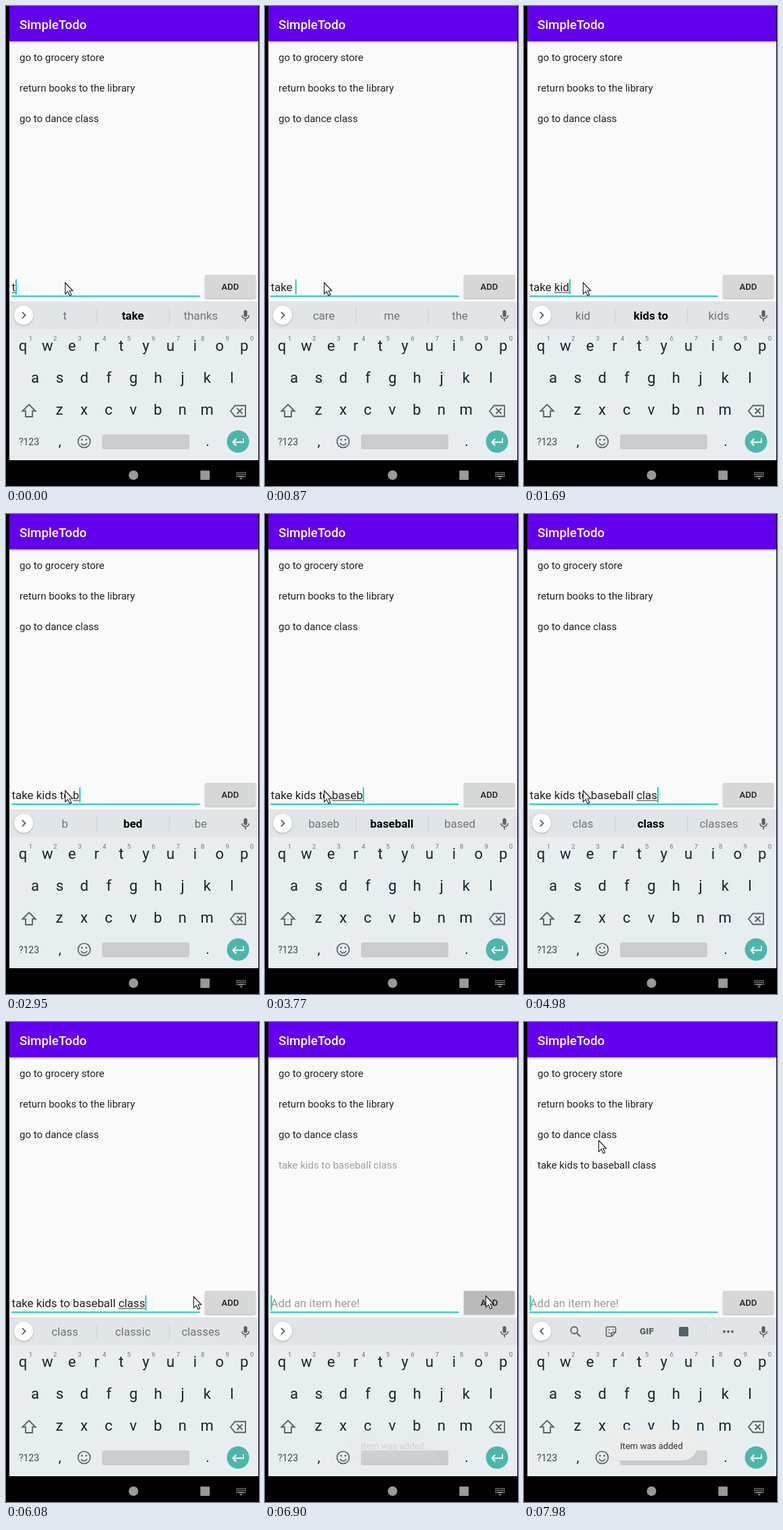
Recreate the animation shown at these times as an HTML page with a canvas. Size 374 by 707 pixels, loop 8000 ms.

```html
<!DOCTYPE html>
<html lang="en">
<head>
<meta charset="utf-8">
<title>Todo list</title>
<style>
html, body { margin: 0; width: 100%; height: 100%; overflow: hidden; background: #000; }
canvas { display: block; width: 374px; height: 707px; }
</style>
</head>
<body>
<canvas id="stage"></canvas>
<script>
const W = 374, H = 707, LOOP = 8000;
const canvas = document.getElementById('stage');
const ctx = canvas.getContext('2d');
const ratio = Math.max(1, window.devicePixelRatio || 1);
canvas.width = W * ratio;
canvas.height = H * ratio;

const TEAL = '#0fcdba', KEY = '#10262f', ICON = '#546169', SOFT = '#6a757b', BAR = '#e1e5e8';

// time, typed text, suggestions; "*" marks the bold one, "_" starts the underlined word
const typing = [
  [0, '_t', 't|*take|thanks'],
  [150, '_tak', 'tak|*take|taking'],
  [300, '_take', 'take|taken|takes'],
  [870, 'take ', 'care|me|the'],
  [1290, 'take _k', 'k|*kids|kind'],
  [1490, 'take _ki', 'ki|*kids|kind'],
  [1690, 'take _kid', 'kid|*kids to|kids'],
  [1850, 'take _kids', 'kids|*kids to|kiss'],
  [1970, 'take kids ', 'to|and|from'],
  [2240, 'take kids _t', 't|*to|the'],
  [2360, 'take kids _to', 'to|to the|too'],
  [2670, 'take kids to ', 'school|the|get'],
  [2950, 'take kids to _b', 'b|*bed|be'],
  [3070, 'take kids to _ba', 'ba|*bath|back'],
  [3190, 'take kids to _bas', 'bas|*baseball|bad'],
  [3620, 'take kids to _base', 'base|*baseball|bases'],
  [3760, 'take kids to _baseb', 'baseb|*baseball|based'],
  [3900, 'take kids to _baseba', 'baseba|*baseball|baseball'],
  [4030, 'take kids to _basebal', 'basebal|*baseball|basal'],
  [4170, 'take kids to _baseball', 'baseball|baseballs|baseline'],
  [4330, 'take kids to baseball ', 'class|game|and'],
  [4580, 'take kids to baseball _c', 'c|*class|can'],
  [4700, 'take kids to baseball _cl', 'cl|*class|clothes'],
  [4830, 'take kids to baseball _cla', 'cla|*class|classes'],
  [4970, 'take kids to baseball _clas', 'clas|*class|classes'],
  [5100, 'take kids to baseball _class', 'class|classic|classes'],
  [6780, '', '']
];

// time, x, y
const pointer = [
  [0, 87, 407], [5680, 93, 407], [5800, 143, 406], [5930, 217, 405],
  [6080, 277, 404], [6230, 315, 403], [6370, 326, 403], [7300, 256, 335],
  [7440, 182, 262], [7580, 132, 210], [7700, 125, 194], [7840, 114, 179], [7980, 110, 174]
];

// time, item opacity, toast opacity, button press, toolbar progress
const adding = [
  [0, 0, 0, 0, 0], [6650, 0, 0, 1, 0], [6780, 0.1, 0, 1, 0], [6900, 0.42, 0.14, 1, 0],
  [7020, 0.85, 0.6, 0.4, 0.4], [7150, 1, 0.95, 0, 1], [7300, 1, 1, 0, 1]
];

const at = (steps, t) => steps.reduce((last, s) => s[0] <= t ? s : last);

function text(str, x, y, size, color, weight = 400, align = 'left') {
  ctx.font = `${weight} ${size}px Roboto, sans-serif`;
  ctx.fillStyle = color;
  ctx.textAlign = align;
  ctx.fillText(str, x, y);
}

function rect(x, y, w, h, color, r = 0) {
  ctx.fillStyle = color;
  ctx.beginPath();
  ctx.roundRect(x, y, w, h, r);
  ctx.fill();
}

function disc(x, y, r, color) {
  ctx.fillStyle = color;
  ctx.beginPath();
  ctx.arc(x, y, r, 0, 7);
  ctx.fill();
}

function line(d, color, width = 1.8, x = 0, y = 0) {
  ctx.save();
  ctx.translate(x, y);
  ctx.strokeStyle = color;
  ctx.lineWidth = width;
  ctx.stroke(new Path2D(d));
  ctx.restore();
}

function shape(d, color, x = 0, y = 0) {
  ctx.save();
  ctx.translate(x, y);
  ctx.fillStyle = color;
  ctx.fill(new Path2D(d));
  ctx.restore();
}

function shadow(blur, dy, alpha, draw) {
  ctx.save();
  ctx.shadowColor = `rgba(0,0,0,${alpha})`;
  ctx.shadowBlur = blur * ratio;
  ctx.shadowOffsetY = dy * ratio;
  draw();
  ctx.restore();
}

function faded(alpha, draw) {
  if (!alpha) return;
  ctx.save();
  ctx.globalAlpha = alpha;
  draw();
  ctx.restore();
}

function drawList(itemAlpha) {
  rect(5, 0, 368, 669, '#fafafa');
  shadow(3, 1, 0.35, () => rect(5, 0, 368, 52, '#6200ee'));
  text('SimpleTodo', 20, 34, 18.76, '#fff', 500);
  ['go to grocery store', 'return books to the library', 'go to dance class']
    .forEach((s, i) => text(s, 20, 81 + 45 * i, 15, '#212121'));
  faded(itemAlpha, () => text('take kids to baseball class', 20, 216, 15, '#212121'));
}

function drawInput(typed, t, press) {
  const x = 8.5, size = 16.88;
  const start = typed.indexOf('_');
  const str = typed.replace('_', '');
  rect(8, 426.6, 278.5, 1.9, TEAL);
  text(str || 'Add an item here!', x, 420, size, str ? '#212121' : '#9b9b9b');
  const end = str ? x + ctx.measureText(str).width : x;
  if (start >= 0) {
    const from = x + ctx.measureText(str.slice(0, start)).width;
    rect(from, 421.6, end - from, 1, '#333');
  }
  if (t < 7300 || t >= 7840) rect(end, 402.5, 1.9, 22.5, TEAL);

  shadow(2, 1, 0.3, () => rect(294, 396, 75, 34.5, '#d6d7d7', 2));
  faded(press, () => rect(294, 396, 75, 34.5, '#b9bab9', 2));
  text('ADD', 331.5, 417.7, 13.1, '#202020', 500, 'center');
}

function drawMic() {
  rect(351.4, 448, 5.2, 10, ICON, 2.6);
  line('M348.8 455.5a5.2 5.2 0 0 0 10.4 0M354 460.7v4', ICON, 1.6);
}

function drawTools() {
  line('M78.2 458.2L83.2 463.2', ICON, 2);
  line('M79.3 454a5 5 0 1 1-10 0a5 5 0 1 1 10 0', ICON, 1.8);
  line('M123.5 449h10q2 0 2 2v6l-6 6h-6q-2 0-2-2v-10q0-2 2-2M135.5 457h-4q-2 0-2 2v4', ICON, 1.6);
  line('M125 456.5q1.5 3 4 2', ICON, 1.3);
  disc(125.7, 453.2, 1, ICON);
  disc(131.3, 453.2, 1, ICON);
  text('GIF', 181.5, 460.4, 13.6, ICON, 900, 'center');
  rect(229, 449, 14, 14, ICON, 1.5);
  rect(268, 445, 1, 22, '#cfd4d7');
  [296, 302, 308].forEach(x => disc(x, 456, 1.9, ICON));
}

function drawBar(words, tools) {
  rect(5, 435, 368, 41, BAR);
  if (words) {
    words.split('|').forEach((w, i) => {
      const bold = w[0] === '*';
      text(w.replace('*', ''), [87, 187.5, 288][i], 462, 16.88, bold ? '#000' : SOFT, bold ? 700 : 400, 'center');
    });
    rect(134, 444, 1, 24, '#cbd0d3');
    rect(241, 444, 1, 24, '#cbd0d3');
  }
  faded(tools, drawTools);
  shadow(3, 1, 0.25, () => disc(26, 455.5, 14, '#fff'));
  ctx.save();
  ctx.translate(26.3, 455.5);
  ctx.rotate(Math.PI * tools);
  line('M-2.4 -4.6L2.2 0L-2.4 4.6', ICON, 1.8);
  ctx.restore();
  drawMic();
}

function drawKeys() {
  const step = 36.35;
  rect(5, 476, 368, 193, '#e8edf0');
  [...'qwertyuiop'].forEach((c, i) => {
    text(c, 25 + step * i, 507.5, 22, KEY, 400, 'center');
    text((i + 1) % 10, 36.3 + step * i, 493, 9.5, SOFT, 400, 'center');
  });
  [...'asdfghjkl'].forEach((c, i) => text(c, 43 + step * i, 555, 22, KEY, 400, 'center'));
  [...'zxcvbnm'].forEach((c, i) => text(c, 79 + step * i, 602, 22, KEY, 400, 'center'));

  line('M0 -9.5L9.7 0H5V8.5H-5V0H-9.7Z', ICON, 1.8, 34, 596.5);
  line('M-11 0L-4.5 -8H11V8H-4.5ZM-1.5 -4L6.5 4M6.5 -4L-1.5 4', ICON, 1.8, 343, 596.5);

  text('?123', 34, 647, 14, '#3c4a52', 400, 'center');
  text(',', 79.5, 648, 21, KEY, 400, 'center');
  text('.', 298, 648, 21, KEY, 400, 'center');
  line('M9 0A9 9 0 1 1 -9 0A9 9 0 1 1 9 0M-4.7 2.2Q0 8 4.7 2.2', ICON, 1.7, 115.5, 641.5);
  disc(112.3, 638.8, 1.4, ICON);
  disc(118.7, 638.8, 1.4, ICON);
  rect(142, 631, 129, 22, '#c9cdd0', 3);
  disc(343, 641.5, 16.5, '#4db6ac');
  line('M8 -5V1H-7M-2.8 -4L-7.6 1L-2.8 6', '#fff', 2, 343, 641.5);
}

function drawNav() {
  rect(0, 669, W, 38, '#000');
  disc(188.5, 691, 7, '#999');
  rect(287.3, 684.3, 13.7, 13.7, '#999', 1);
  for (let row = 0; row < 3; row++)
    for (let i = 0; i < 5; i++) rect(340.5 + 3 * i, 686.5 + 2.8 * row, 1.9, 1.7, '#999');
  rect(343.5, 692.1, 7.9, 1.7, '#999');
  shape('M0 0h5l-2.5 2.5z', '#999', 345, 695.3);
}

function drawToast(alpha) {
  faded(alpha, () => {
    shadow(2, 0.5, 0.08, () => rect(120, 600.5, 137, 45.5, '#ebecec', 22.7));
    text('Item was added', 188.5, 628.5, 13.13, '#303030', 400, 'center');
  });
}

function drawPointer(x, y) {
  const arrow = 'M.5 .5V17L4.3 13.4L7 19.5L9.7 18.3L7 12.3H11.6Z';
  shape(arrow, '#fff', x, y);
  line(arrow, '#1c1c28', 1.1, x, y);
}

function draw(t) {
  const [, typed, words] = at(typing, t);
  const [, item, toast, press, tools] = at(adding, t);
  const [, px, py] = at(pointer, t);
  ctx.setTransform(ratio, 0, 0, ratio, 0, 0);
  ctx.lineJoin = 'miter';
  rect(0, 0, W, H, '#000');
  drawList(item);
  drawInput(typed, t, press);
  drawBar(words, tools);
  drawKeys();
  drawNav();
  drawToast(toast);
  drawPointer(px, py);
}

const begin = performance.now();
function tick() {
  draw((performance.now() - begin) % LOOP);
  requestAnimationFrame(tick);
}
tick();
</script>
</body>
</html>
```
